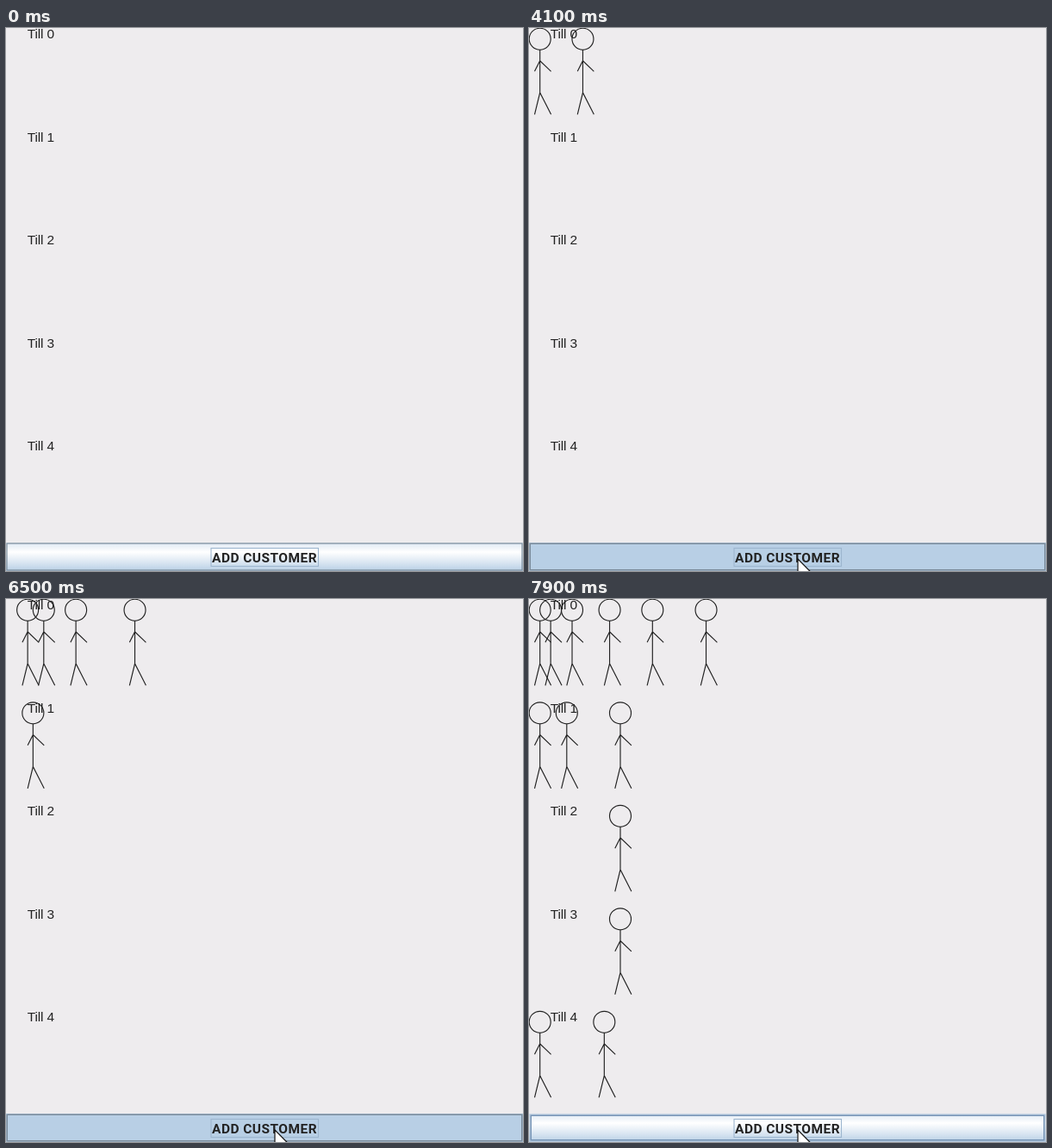
Recreate the animation shown at these times as an HTML page with a canvas. Size 600 px wide and 630 px high, loop 8 s.

```html
<!DOCTYPE html>
<html lang="en">
<head>
<meta charset="utf-8">
<title>Till queues</title>
<style>
  html, body { margin: 0; width: 100%; height: 100%; overflow: hidden; background: #eeecee; }
  canvas { display: block; }
</style>
</head>
<body>
<canvas id="stage" width="600" height="630"></canvas>
<script>
const ctx = document.getElementById('stage').getContext('2d');
const LOOP = 8000, TICK = 100, ROW = 119.5, STEP = 6.22;
const W = 600, H = 630, TOP = 597, INK = '#222';

// Customers of each till: arrival time, ms per step and, if they go, leaving time.
// Everyone walks to the right at a steady pace of their own.
const tills = [
  [[2870, 162], [4100, 150, 6500], [4930, 141], [5730, 166], [5880, 317], [7080, 400], [7850, 200]],
  [[6190, 114], [7090, 160], [7800, 250]],
  [[6560, 89]],
  [[6700, 80]],
  [[6830, 89], [7750, 400]]
];

// The mouse comes down onto the button, then settles below its label.
const pointer = [[1600, 424, 84], [1800, 350, 598], [2000, 335, 626], [2600, 312, 616]];

function pointerAt(t) {
  const i = pointer.findIndex(key => key[0] > t);
  if (i < 0) return pointer[pointer.length - 1].slice(1);
  const [t0, x0, y0] = pointer[i - 1], [t1, x1, y1] = pointer[i];
  const p = (t - t0) / (t1 - t0);
  return [x0 + (x1 - x0) * p, y0 + (y1 - y0) * p];
}

function frame(color, inset, width) {
  ctx.strokeStyle = color;
  ctx.lineWidth = width;
  const d = inset + width / 2;
  ctx.strokeRect(d, TOP + d, W - 2 * d, H - TOP - 2 * d);
}

function person(x, y) {
  ctx.save();
  ctx.translate(x, y);
  ctx.strokeStyle = INK;
  ctx.lineWidth = 1.15;
  ctx.beginPath();
  ctx.arc(0, 12.8, 12.5, 0, 2 * Math.PI);
  ctx.moveTo(0, 25.3);
  ctx.lineTo(0, 75);
  for (const [joint, end] of [[38, 50.3], [75, 100.3]]) {
    ctx.moveTo(-6.2, end);
    ctx.lineTo(0, joint);
    ctx.lineTo(12.9, end);
  }
  ctx.stroke();
  ctx.restore();
}

function text(label, x, y, font, spacing, align) {
  ctx.fillStyle = INK;
  ctx.font = font;
  ctx.letterSpacing = spacing;
  ctx.textAlign = align;
  ctx.fillText(label, x, y);
}

function button(hover, pressed) {
  const shine = ctx.createLinearGradient(0, TOP, 0, H);
  ['#dde8f3', '#fff', '#dde8f3', '#b8cfe5']
    .forEach((color, i) => shine.addColorStop(Math.min(1, i * .334), color));
  ctx.fillStyle = pressed ? '#b8cfe5' : shine;
  ctx.fillRect(0, TOP, W, H - TOP);
  if (pressed) {
    frame('#7a8a99', .5, 1.5);
  } else if (hover) {
    frame('#b4c6d9', .5, 1);
    frame('#7593b5', 1.5, 1.5);
  } else {
    frame('#7a8a99', .4, 1.2);
  }
  ctx.strokeStyle = '#9db6cf';
  ctx.lineWidth = 1.1;
  ctx.strokeRect(238, 603.5, 124.5, 21);
  text('ADD CUSTOMER', 300, 620, 'bold 15.5px Roboto, Arial, sans-serif', '0.45px', 'center');
}

function arrow(x, y) {
  ctx.save();
  ctx.translate(x, y);
  ctx.beginPath();
  [[0, 0], [0, 20.5], [4.7, 16], [8, 23.5], [11.3, 22], [8, 14.7], [14.5, 14.7]]
    .forEach(p => ctx.lineTo(...p));
  ctx.closePath();
  ctx.fillStyle = '#fff';
  ctx.fill();
  ctx.strokeStyle = '#111';
  ctx.lineWidth = 1.2;
  ctx.stroke();
  ctx.restore();
}

function draw() {
  const t = Math.floor(performance.now() % LOOP / TICK) * TICK;
  let pressed = false;
  ctx.fillStyle = '#eeecee';
  ctx.fillRect(0, 0, W, H);

  tills.forEach((queue, i) => {
    const y = i * ROW;
    text('Till ' + i, 24.7, y + 12.3, '15.5px "Liberation Sans", Arial, sans-serif', '-0.15px', 'left');
    for (const [start, pace, leave = LOOP] of queue) {
      const age = t - start;
      if (age >= 0 && t < leave) person(12.7 + STEP * Math.round(age / pace), y);
      // Each arrival is one short click on the button.
      if (age >= -60 && age < 40) pressed = true;
    }
  });

  button(t >= 1900, pressed);
  if (t >= pointer[0][0]) arrow(...pointerAt(t));
  requestAnimationFrame(draw);
}
draw();
</script>
</body>
</html>
```
